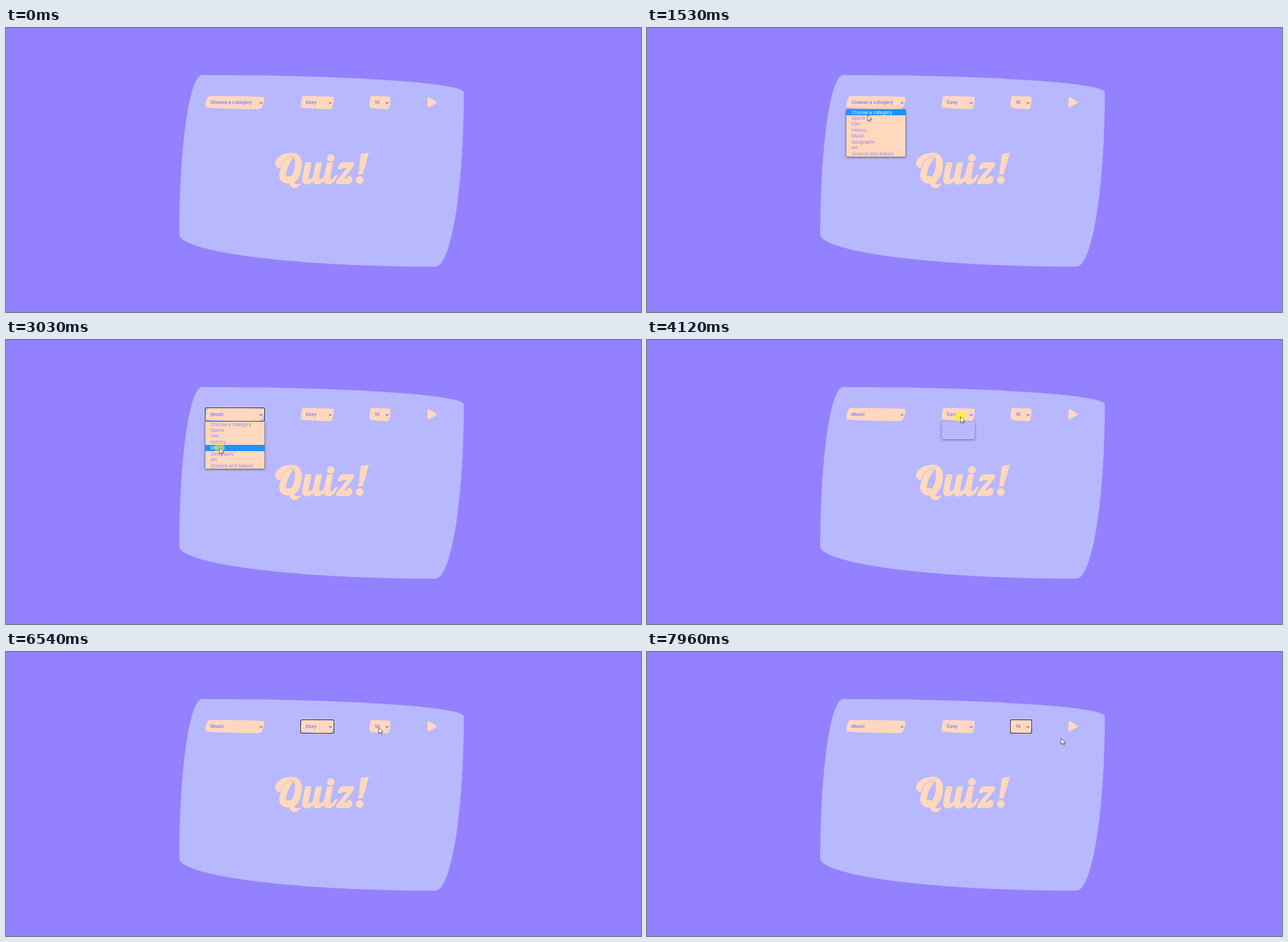
Recreate the animation shown at these times as an HTML page. Size 1118 by 501 pixels, loop 8000 ms.

```html
<!DOCTYPE html>
<html lang="en">
<head>
<meta charset="utf-8">
<title>Quiz</title>
<style>
  :root {
    --violet: #9381ff; --lilac: #b8b8ff; --peach: #ffd8be;
    --wobbly: 8% 92% 10% 90% / 83% 9% 91% 17%;
  }
  html, body { margin: 0; width: 100%; height: 100%; overflow: hidden; background: var(--violet); }
  body { position: relative; font: 8px Inter, sans-serif; color: var(--violet); }
  .panel, .select, .list, .art { position: absolute; }
  .panel {
    left: 304.5px; top: 83px; width: 501px; height: 337.5px;
    background: var(--lilac); border-radius: var(--wobbly);
  }
  .art { left: 0; top: 0; width: 1118px; height: 501px; fill: var(--peach); }
  .pointer { z-index: 2; }
  .select { top: 119.8px; height: 23.4px; font-weight: 700; line-height: 23.4px; }
  .select::before {
    content: ""; position: absolute; inset: 0;
    background: var(--peach); border-radius: var(--wobbly);
  }
  .select.focus::after {
    content: ""; position: absolute; inset: -.7px;
    border: 1.4px solid #101018; border-radius: 2px; box-shadow: 0 0 0 .5px #fff;
  }
  .select span { position: absolute; left: 9px; white-space: nowrap; }
  .select svg { position: absolute; right: 3px; top: 10px; width: 6px; height: 5px; }
  .list {
    top: 143.6px; white-space: nowrap; visibility: hidden;
    box-shadow: 0 0 0 .5px #777, 0 1px 4px #0009;
  }
  .list.open { visibility: visible; background: var(--peach); }
  .list.blank { background: var(--lilac); box-shadow: 0 1px 4px #0007; }
  .list.blank div { visibility: hidden; }
  .list div { height: 10.43px; line-height: 10.43px; padding-left: 9px; }
  .list .on { background: #1e90ff; color: #fff; }
</style>
</head>
<body>
<div class="panel"></div>
<svg class="art" viewBox="0 0 1118 501">
  <defs>
    <path id="stem" d="M527 237H538L533 262C532 267 535 268 538 265C540 263 541 261 542 259H546C543 270 536 276 529 276C523 276 520 271 522 262Z"/>
  </defs>
  <path d="M744 124L756 131L744 138Z" stroke="#ffd8be" stroke-width="4" stroke-linejoin="round"/>
  <g role="img" aria-label="Quiz!">
    <path fill-rule="evenodd" d="M484 247C478 248 474 244 474 239C474 229 487 220 503 220C515 220 521 228 521 240
      C521 256 514 268 507 273C510 276 514 276 518 274C518 278 513 283 508 282C503 282 500 279 498 274
      C489 276 481 270 481 259C481 255 482 250 484 247Z
      M507 228C511 238 508 255 501 263C499 260 495 260 493 263C492 254 498 238 507 228Z"/>
    <path d="M483.5 248C484 238 492 227 507 227" fill="none" stroke="#b8b8ff"/>
    <use href="#stem"/>
    <use href="#stem" x="18.5"/>
    <use href="#stem" x="38"/>
    <circle cx="572" cy="229.3" r="6.7"/>
    <path d="M584 249C585 240 589 237 595 237H613L612 244L595 265C598 264 602 267 601 262C603 260 609 261 610 265
      C611 271 606 276 600 275H581L582 269L601 246C596 248 592 246 590 249Z"/>
    <path d="M625 222L639 220L628 258L620 259Z"/>
    <circle cx="622.8" cy="268.3" r="6.8"/>
  </g>
</svg>
<svg class="art pointer" viewBox="0 0 1118 501">
  <circle id="halo" r="9.3" fill="#ffee33"/>
  <path id="arrow" d="M0 0V11L2.6 8.7L4.3 12L6 11.2L4.4 8H7.9Z" fill="#fff" stroke="#222" stroke-width=".8"/>
</svg>
<script>
const LOOP = 8000, ENTER = 70, DWELL = 280, FLASH = 100, CLOSE_DELAY = 160, PAINT_DELAY = 70;
const LIST_TOP = 143.6, ROW = 10.43;

const menus = [
  { x: 351, w: 104, opens: 920, picks: 2960, choice: 'Music',
    options: ['Choose a category', 'Sports', 'Film', 'History', 'Music', 'Geography', 'Art', 'Science and Nature'] },
  { x: 519, w: 58, opens: 4120, picks: 5930, choice: 'Easy', options: ['Easy', 'Medium', 'Hard'] },
  { x: 640, w: 37, opens: 6670, picks: 7560, choice: '14',
    options: Array.from({ length: 6 }, (_, i) => 10 + 2 * i) },
];

// The pointer rests at each stop for DWELL, then eases to arrive at the next one.
const stops = [
  { at: ENTER - DWELL, x: 1045, y: 489 },
  { at: 850, x: 396, y: 126 },
  { at: 1530, x: 388, y: 153 },
  { at: 2900, x: 376, y: 190 },
  { at: 3790, x: 552, y: 135 },
  { at: 5050, x: 541, y: 166 },
  { at: 5670, x: 543, y: 149 },
  { at: 6540, x: 656, y: 133 },
  { at: 7230, x: 657, y: 167 },
  { at: 7960, x: 729, y: 152 },
];

const byId = id => document.getElementById(id);
const within = (t, from, to) => t >= from && t < to;
const clicks = menus.flatMap(m => [m.opens, m.picks]);

function add(className, { x, w }, html) {
  const el = document.createElement('div');
  el.className = className;
  el.style.left = x + 'px';
  el.style.width = w + 'px';
  el.innerHTML = html;
  document.body.append(el);
  return el;
}

for (const m of menus) {
  m.select = add('select', m, '<span></span><svg viewBox="0 0 6 5"><path d="M.6 .8L3 3.3L5.4 .8" ' +
    'fill="none" stroke="#6f5ce6" stroke-width="1.2"/></svg>');
  m.label = m.select.firstChild;
  m.list = add('list', m, m.options.map(o => `<div>${o}</div>`).join(''));
}

function pointerAt(t) {
  const to = stops.find(s => s.at > t) || stops.at(-1);
  const from = stops[stops.indexOf(to) - 1];
  const start = from.at + DWELL;
  const p = Math.min(1, Math.max(0, (t - start) / (to.at - start)));
  const k = p * p * (3 - 2 * p);
  return { x: from.x + (to.x - from.x) * k, y: from.y + (to.y - from.y) * k };
}

function render(t) {
  const { x, y } = pointerAt(t);
  const arrow = byId('arrow'), halo = byId('halo');
  for (const el of [arrow, halo]) el.setAttribute('transform', `translate(${x} ${y})`);
  arrow.style.visibility = t < ENTER ? 'hidden' : 'visible';

  const click = clicks.find(c => within(t, c, c + FLASH));
  halo.style.opacity = click ? .9 - .55 * (t - click) / FLASH : 0;

  const row = Math.max(0, Math.floor((y - LIST_TOP) / ROW));
  menus.forEach((m, i) => {
    const nextOpens = menus[i + 1]?.opens ?? LOOP;
    m.label.textContent = t >= m.picks ? m.choice : m.options[0];
    m.select.classList.toggle('focus', within(t, m.picks, nextOpens));
    m.list.classList.toggle('open', within(t, m.opens, m.picks + CLOSE_DELAY));
    m.list.classList.toggle('blank', within(t, m.opens, m.opens + PAINT_DELAY));
    [...m.list.children].forEach((el, n) => el.classList.toggle('on', n === row));
  });
}

const start = performance.now();
function tick() {
  render((performance.now() - start) % LOOP);
  requestAnimationFrame(tick);
}
tick();
</script>
</body>
</html>
```
